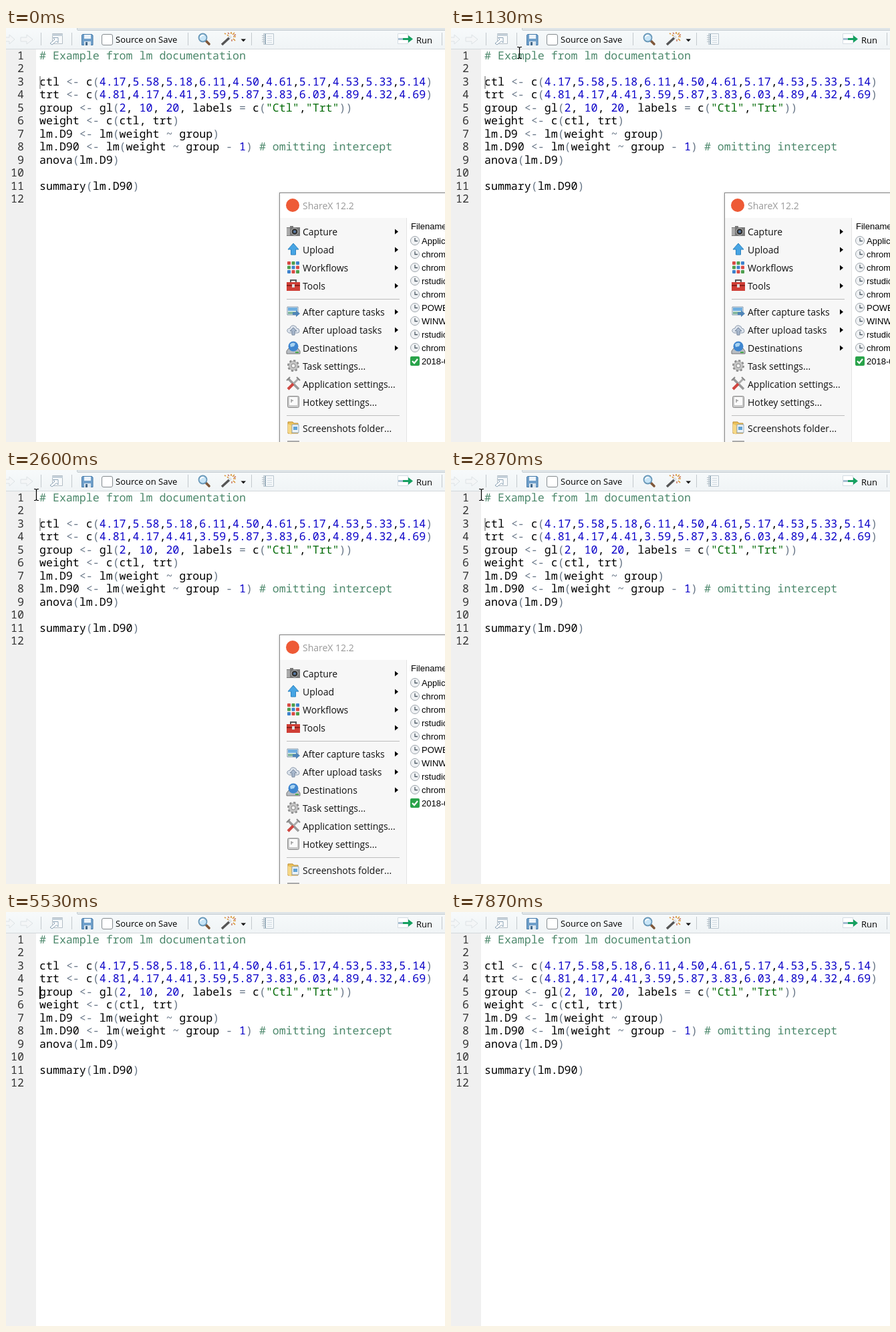
Animation, 657 px wide and 619 px high, one loop 8 s. Source, as an HTML page:

```html
<!DOCTYPE html>
<html lang="en">
<head>
<meta charset="utf-8">
<title>Running code from the editor</title>
<style>
  html, body { margin: 0; width: 100%; height: 100%; overflow: hidden; background: #fff; }
  svg { display: block; }
  text { white-space: pre; }
  .code { font: 16.62px "Noto Sans Mono", monospace; fill: #000; text-rendering: geometricPrecision; }
  .code .comment { fill: #4c886b; }
  .code .number { fill: #0a00c8; }
  .code .string { fill: #036a07; }
  .code .operator { fill: #687687; }
  .gutter { fill: #333; text-anchor: end; }
  .ui { font: 13px "Open Sans", sans-serif; fill: #000; }
  .menu { font: 14px "Open Sans", sans-serif; fill: #111; }
  .files { font: 13px "Liberation Sans", Arial, sans-serif; fill: #000; }

  #window { animation: window 8s step-end infinite; }
  #caret { animation: caret 8s step-end infinite; }
  #cursor { animation: path 8s step-end infinite, seen 8s step-end infinite; }
  #arrow { animation: arrow 8s step-end infinite; }
  #ibeam { animation: ibeam 8s step-end infinite; }

  @keyframes window { 0% { visibility: visible } 35.875%, 100% { visibility: hidden } }

  @keyframes caret {
    0%      { opacity: 1; fill: #aaa; transform: translateY(72px) }
    45%     { opacity: 0; fill: #000; transform: translateY(72px) }
    48.375% { opacity: 1; fill: #000; transform: translateY(72px) }
    56.625% { opacity: 0; fill: #000; transform: translateY(72px) }
    58.375% { opacity: 1; fill: #000; transform: translateY(91px) }
    69.125% { opacity: 1; fill: #000; transform: translateY(111px) }
    75%     { opacity: 1; fill: #000; transform: translateY(130px) }
    81.625% { opacity: 0; fill: #000; transform: translateY(130px) }
    83.375% { opacity: 1; fill: #000; transform: translateY(150px) }
    90%     { opacity: 0; fill: #000; transform: translateY(150px) }
    91.625% { opacity: 1; fill: #000; transform: translateY(169px) }
    98.375%, 100% { opacity: 0; fill: #000; transform: translateY(169px) }
  }

  /* The pointer advances once every 1/15 s, hence the stepped segments. */
  @keyframes path {
    0%      { transform: translate(205px, 520px) }
    2.5%    { transform: translate(205px, 520px); animation-timing-function: steps(4) }
    5.875%  { transform: translate(68px, 13px) }
    9.167%  { transform: translate(68px, 13px); animation-timing-function: steps(6) }
    14.125% { transform: translate(102px, 37px); animation-timing-function: steps(3) }
    16.667% { transform: translate(195px, 41px); animation-timing-function: steps(4) }
    20%     { transform: translate(72px, 18px); animation-timing-function: steps(11) }
    29.125% { transform: translate(45px, 37px) }
    42.54%  { transform: translate(45px, 37px); animation-timing-function: steps(4) }
    45.833%, 100% { transform: translate(355px, 8px) }
  }
  @keyframes seen {
    0%, 29.125%, 46.625%, 100% { visibility: hidden }
    2.5%, 32.5% { visibility: visible }
  }
  @keyframes arrow {
    0%, 13.3%, 27.5%, 100% { opacity: 0 }
    5.875%, 18.33%, 43.375% { opacity: 1 }
  }
  @keyframes ibeam {
    0%, 13.3%, 27.5% { opacity: 1 }
    5.875%, 18.33%, 43.375%, 100% { opacity: 0 }
  }
</style>
</head>
<body>
<svg width="657" height="619" viewBox="0 0 657 619">
  <defs>
    <filter id="shadow" x="-5%" y="-5%" width="110%" height="110%">
      <feDropShadow dx="0" dy="0" stdDeviation="1.6" flood-color="#000" flood-opacity=".25"/>
    </filter>
    <linearGradient id="bar" x2="0" y2="1">
      <stop stop-color="#f7fafb"/><stop offset="1" stop-color="#f0f4f6"/>
    </linearGradient>
  </defs>

  <rect y="32" width="45" height="587" fill="#f0f0f0"/>
  <g id="code" class="code"></g>
  <rect id="caret" x="50" width="2" height="19"/>

  <g id="toolbar">
    <rect width="657" height="31" fill="url(#bar)"/>
    <path d="M107 0H657V3H107Z" fill="#dfe5e8"/>
    <path d="M107 3.5H657M106.5 0V3" stroke="#c5cdd2" fill="none"/>
    <path d="M0 31.5H657" stroke="#d3d8db"/>
    <path d="M52.5 7V26M98.5 7V26M272.5 7V26M367.5 7V26M652.5 7V26" stroke="#c3c9cd"/>
    <path d="M0 14H5V10L13 17L5 24V20H0M40 17L31 10V14H22V20H31V24Z" fill="#f4f6f7" stroke="#dde2e5"/>
    <g transform="translate(65 8)">
      <path d="M4.5 .5H19.5V15.5H4.5Z" fill="#f8fafb" stroke="#b4bec6"/>
      <path d="M4 1H20V4H4Z" fill="#c5d1da"/>
      <path d="M1 15L8 9L5.500 6.500H13V14L10.500 11.500L4 17Z" fill="#fff" stroke="#8aa2b5"/>
    </g>
    <g transform="translate(113 9)">
      <path d="M1.500 .5H15.500L17 2V16.500H.5V1.500Z" fill="#6f9fca" stroke="#477ba9"/>
      <path d="M4 1H14V7H4Z" fill="#edf4fa"/>
      <path d="M4 11H14V17H4Z" fill="#dbe6ef"/>
      <path d="M6 12H9V17H6Z" fill="#42688a"/>
    </g>
    <rect x="143.500" y="9.500" width="16" height="16" rx="2.500" fill="#fff" stroke="#858b8f"/>
    <text class="ui" x="164" y="22">Source on Save</text>
    <g transform="translate(287 7)">
      <path d="M11 11L17 17" stroke="#7f5739" stroke-width="3.600" stroke-linecap="round"/>
      <circle cx="7.500" cy="7.500" r="6" fill="#c8e5f7" stroke="#6998b8" stroke-width="1.800"/>
      <path d="M4 7Q5 3 9 4" fill="none" stroke="#fff" stroke-width="1.500"/>
    </g>
    <g transform="translate(322 6)">
      <path d="M1 19L14 7" stroke="#555" stroke-width="3.500"/>
      <path d="M12 9L15 6" stroke="#e0e4e7" stroke-width="3.500"/>
      <path d="M17 4L20 1M18 7H22M15 3V0M9 4L11 6M18 10L21 13M5 2L7 3" stroke="#da973c" stroke-width="1.700"/>
      <path d="M10 1L12 3M19 5L22 4M16 11V14" stroke="#c46b56" stroke-width="1.400"/>
    </g>
    <path d="M351.500 16.500H359L355.250 20.500Z" fill="#111"/>
    <g transform="translate(383 8)">
      <path d="M2.500 .5H17.500V16.500H2.500Z" fill="#f5f8fa" stroke="#bac6cf"/>
      <path d="M5 1V16" stroke="#98adbc" stroke-width="2"/>
      <path d="M8 4.500H15M8 7.500H15M8 10.500H15M8 13.500H15" stroke="#d2dce3"/>
      <path d="M0 3.500H5M0 6.500H5M0 9.500H5M0 12.500H5" stroke="#b6c2ca"/>
    </g>
    <g transform="translate(586 8)">
      <path d="M.5 .5H15.500V15.500H.5Z" fill="#fff" stroke="#d4dce2"/>
      <path d="M1 8.500H8" stroke="#a4bdd1" stroke-width="3"/>
      <path d="M8 7H16V3L23 8.500L16 14V10H8Z" fill="#15a060"/>
    </g>
    <text class="ui" x="614" y="23">Run</text>
  </g>

  <g id="window">
    <rect x="409.500" y="246.500" width="270" height="400" fill="#fff" stroke="#8b8b8b" filter="url(#shadow)"/>
    <rect x="410" y="284" width="190" height="335" fill="#f7f7f7"/>
    <path d="M599.500 284V619" stroke="#e4e4e4"/>
    <circle cx="429" cy="265" r="10" fill="#ee5a36"/>
    <text class="menu" x="444" y="271" style="fill:#999">ShareX 12.2</text>
    <path d="M420 405.500H589M420 579.500H589" stroke="#bdbdbd"/>
    <path d="M421 619V617H439V619Z" fill="#aaa"/>
    <g id="menu" class="menu"></g>
    <g id="files" class="files"><text x="606" y="301">Filename</text></g>
  </g>

  <g id="cursor">
    <path id="arrow" d="M.5 .5V16L4 12.500L6.500 18L9 17L6.500 11.500H11.500Z" fill="#fff" stroke="#000"/>
    <path id="ibeam" d="M-3 -8.500H-1L.5 -7.500L2 -8.500H4M.5 -8V8M-3 8.500H-1L.5 7.500L2 8.500H4" fill="none" stroke="#000" stroke-width="1.200"/>
  </g>
</svg>

<script>
const byId = id => document.getElementById(id);
const append = (id, markup) => byId(id).insertAdjacentHTML('beforeend', markup);
const escape = s => s.replace(/&/g, '&amp;').replace(/</g, '&lt;');

const program = `# Example from lm documentation

ctl <- c(4.17,5.58,5.18,6.11,4.50,4.61,5.17,4.53,5.33,5.14)
trt <- c(4.81,4.17,4.41,3.59,5.87,3.83,6.03,4.89,4.32,4.69)
group <- gl(2, 10, 20, labels = c("Ctl","Trt"))
weight <- c(ctl, trt)
lm.D9 <- lm(weight ~ group)
lm.D90 <- lm(weight ~ group - 1) # omitting intercept
anova(lm.D9)

summary(lm.D90)
`;

const token = /(?<comment>#.*)|(?<string>"[^"]*")|(?<number>\b\d+(?:\.\d+)?\b)|(?<operator><-|[()=~-])|[\w.]+|[^\w]/g;

function highlight(line) {
  return [...line.matchAll(token)].map(({ 0: word, groups }) => {
    const kind = Object.keys(groups).find(name => groups[name]);
    return kind ? `<tspan class="${kind}">${escape(word)}</tspan>` : escape(word);
  }).join('');
}

program.split('\n').forEach((line, i) => {
  const y = 47 + i * 19.45;
  append('code', `<text class="gutter" x="27" y="${y}">${i + 1}</text><text x="50" y="${y}">${highlight(line)}</text>`);
});

// Menu icons are drawn in a 20 by 20 box.
const tiles = [0, 1, 2].flatMap(row => [0, 1, 2].map(col =>
  `<rect x="${1 + col * 6.5}" y="${1 + row * 6.5}" width="5" height="5" rx="1" fill="${['#d94b45', '#4e9e4e', '#3d82cc'][(row + col) % 3]}"/>`)).join('');

const cloud = '<path d="M4 15Q0 14 1 10Q2 8 5 8Q6 3 11 4Q15 5 15 8Q19 8 19 12Q19 15 16 15Z" fill="#dce3ec" stroke="#8d9aac"/>';

const icons = {
  camera: '<path d="M0 4H5V2H10V4H20V17H0Z" fill="#777"/><path d="M0 5H5V16H0Z" fill="#aaa"/><circle cx="12" cy="10.500" r="5" fill="#333" stroke="#ccc"/><circle cx="12" cy="10.500" r="2" fill="#587ca8"/>',
  up: '<path d="M10 1L18 10H13.500V18H6.500V10H2Z" fill="#47a5e4" stroke="#2c82be"/>',
  tiles,
  toolbox: '<path d="M6 5V2H14V5" fill="none" stroke="#555" stroke-width="2"/><path d="M0 5H20V18H0Z" fill="#cf3e36"/><path d="M0 10H20" stroke="#8d211c" stroke-width="2"/><path d="M8 8H12V13H8Z" fill="#ddd"/>',
  image: '<path d="M1 3H17V15H1Z" fill="#fff" stroke="#7f95aa"/><path d="M2 4H16V9H2Z" fill="#71afe0"/><path d="M2 10H16V14H2Z" fill="#87b9a1"/><path d="M9 11H14V8L20 13L14 18V15H9Z" fill="#4f85b8"/>',
  cloud: cloud + '<path d="M10 7L15 12H12V18H8V12H5Z" fill="#a9b9ce" stroke="#76869b"/>',
  drive: '<path d="M3 11H17L20 15V19H0V15Z" fill="#b8bdc3" stroke="#777"/><circle cx="10" cy="8" r="7.500" fill="#3f86cf"/><path d="M5 5Q9 1 13 4L11 8L6 9Z" fill="#a9d4f2"/><path d="M13 17H18" stroke="#4caa4c" stroke-width="2"/>',
  gear: '<circle cx="10" cy="10" r="7.500" fill="#b9b9b9" stroke="#8b8b8b" stroke-width="3" stroke-dasharray="3 2.890"/><circle cx="10" cy="10" r="6.500" fill="#c4c4c4"/><circle cx="10" cy="10" r="3" fill="#f2f2f2" stroke="#888"/>',
  tools: '<path d="M2 2L18 18" stroke="#999" stroke-width="3.500"/><path d="M18 2L10 10" stroke="#aaa" stroke-width="3"/><path d="M10 10L2 18" stroke="#cf4640" stroke-width="4"/><path d="M0 5L5 0M15 0L20 5" stroke="#888" stroke-width="2"/>',
  key: '<rect x="1.500" y="1.500" width="17" height="17" rx="2" fill="#c9c9c9" stroke="#8c8c8c"/><rect x="4" y="3" width="12" height="12" rx="1" fill="#fafafa"/><path d="M7 6V11M7 8H10" stroke="#777"/>',
  folder: '<path d="M2 1H9L11 3H17V18H2Z" fill="#eac15b" stroke="#bf8e32"/><path d="M8 5H18V17H8Z" fill="#eef4f8" stroke="#94aabb"/><path d="M10 8H16V13H10Z" fill="#62a3d5"/><path d="M2 4L7 6V20L2 17Z" fill="#f6d886"/>'
};

const menu = [
  [305, 'camera', 'Capture', true],
  [332, 'up', 'Upload', true],
  [359, 'tiles', 'Workflows', true],
  [386, 'toolbox', 'Tools', true],
  [425, 'image', 'After capture tasks', true],
  [452, 'cloud', 'After upload tasks', true],
  [479, 'drive', 'Destinations', true],
  [506, 'gear', 'Task settings...'],
  [533, 'tools', 'Application settings...'],
  [560, 'key', 'Hotkey settings...'],
  [599, 'folder', 'Screenshots folder...']
];

for (const [y, icon, label, opens] of menu) {
  append('menu', `<g transform="translate(420 ${y - 11})">${icons[icon]}</g><text x="444" y="${y + 5}">${label}</text>` +
    (opens ? `<path d="M582 ${y - 4.500}L587 ${y - .5}L582 ${y + 3.500}Z" fill="#000"/>` : ''));
}

const clock = '<circle r="6.500" fill="#f0f2f4" stroke="#9ba3aa"/><path d="M0 -4V.5H4" fill="none" stroke="#4d5a65" stroke-width="1.300"/>';
const check = '<rect x="-7" y="-7" width="14" height="14" rx="2" fill="#29a34a"/><path d="M-4 0L-1 3L4 -3" fill="none" stroke="#fff" stroke-width="2.200"/>';

['Application', 'chrome', 'chrome', 'rstudio', 'chrome', 'POWERPNT', 'WINWORD', 'rstudio', 'chrome', '2018-0'].forEach((name, i) => {
  const y = 318 + i * 20;
  append('files', `<g transform="translate(612 ${y})">${i < 9 ? clock : check}</g><text x="622" y="${y + 5}">${name}</text>`);
});
</script>
</body>
</html>
```
